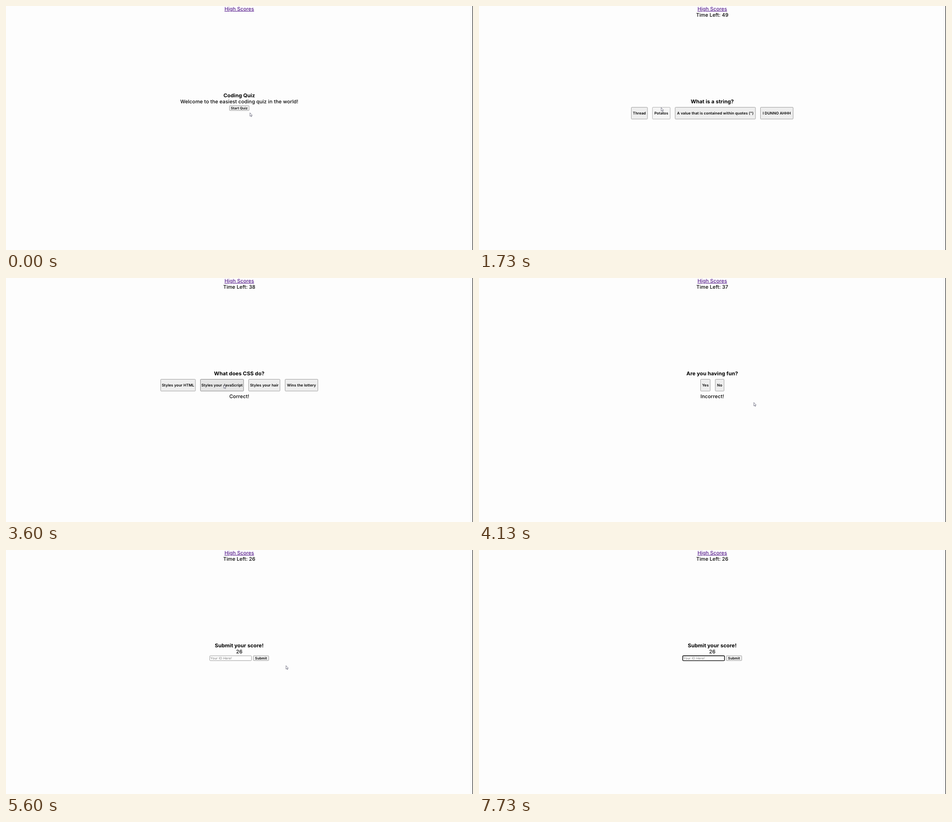
Animation, 998 px wide and 524 px high, one loop 8 s. Source, as an HTML page:

```html
<!DOCTYPE html>
<html lang="en">
<head>
<meta charset="utf-8">
<title>Coding Quiz</title>
<style>
  html, body { margin: 0; width: 100%; height: 100%; overflow: hidden; background: #fdfdfd; }
  svg { display: block; }
  text { font: 500 10.7px Inter, "Open Sans", sans-serif; letter-spacing: .1px; text-anchor: middle; text-rendering: geometricPrecision; white-space: pre; }
  .title { font-weight: 700; font-size: 11.1px; }
  .answer { font-weight: 600; font-size: 7.9px; }
  .small { font-weight: 600; font-size: 7.3px; }
  .hint { font-weight: 400; font-size: 7.1px; fill: #757575; text-anchor: start; }
  .link { fill: #551a8b; text-decoration: underline; }
  .button { fill: #eee; stroke: #8c8c8c; stroke-width: .8; }
  .hover { fill: #e5e5e5; stroke: #6c6c6c; }
  .active { fill: #f5f5f5; stroke: #a0a0a0; }
  .input { fill: #fff; stroke: #858585; stroke-width: .8; }
  .focus { stroke: #000; stroke-width: 1.4; }
  .cursor { fill: #fff; stroke: #4a4a60; stroke-width: .7; }
</style>
</head>
<body>
<svg id="stage" width="998" height="524" viewBox="0 0 998 524"></svg>
<script>
const LOOP = 8000, MID = 498.5;
const START = 665, TIMER = 1730, CSS = 1865, CORRECT = 2600, FUN = 3800, SUBMIT = 5130, FOCUS = 6180;
const stage = document.getElementById('stage');

// Answers: label, left edge, right edge
const questions = {
  string: ['What is a string?', [
    ['Thread', 325.5, 360], ['Potatos', 370.7, 408.5],
    ['A value that is contained within quotes (")', 419.2, 590.8], ['I DUNNO AHHH', 601.5, 671.3]]],
  css: ['What does CSS do?', [
    ['Styles your HTML', 330.5, 404.8], ['Styles your JavaScript', 415.5, 507.7],
    ['Styles your hair', 518.5, 585.5], ['Wins the lottery', 596.5, 666.5]]],
  fun: ['Are you having fun?', [['Yes', 473.5, 494], ['No', 505, 523.7]]]
};

// Pointer keys: time, x, y
const path = [
  [60, 521, 229], [330, 513, 223], [790, 513, 223], [1060, 470, 234], [1200, 470, 234],
  [1530, 389, 218], [2260, 389, 218], [2800, 465, 229], [3830, 465, 229], [4130, 587, 267],
  [4330, 587, 267], [4860, 484, 230], [5150, 484, 230], [5360, 545, 272], [5600, 598, 248],
  [5700, 598, 248], [5930, 585, 285], [6180, 500, 234]
];
const presses = [[600, START], [TIMER, CSS], [3730, FUN], [5060, SUBMIT]];

function pointerAt(t) {
  const i = path.findIndex(key => key[0] > t);
  if (i === 0) return path[0].slice(1);
  if (i < 0) return path[path.length - 1].slice(1);
  const [t0, x0, y0] = path[i - 1], [t1, x1, y1] = path[i];
  const u = (t - t0) / (t1 - t0), e = u * u * (3 - 2 * u);
  return [x0 + (x1 - x0) * e, y0 + (y1 - y0) * e];
}

const text = (label, y, type = '', x = MID) => `<text x="${x}" y="${y}" class="${type}">${label}</text>`;
const box = (left, top, right, bottom, type) =>
  `<rect x="${left}" y="${top}" width="${right - left}" height="${bottom - top}" rx="1.3" class="${type}"/>`;

function draw(t) {
  const [px, py] = pointerAt(t);
  const pressed = presses.some(([from, to]) => t >= from && t < to);
  const button = (label, left, top, right, bottom, type) => {
    const over = px >= left && px <= right && py >= top && py <= bottom;
    const state = over ? (pressed ? 'active' : 'hover') : '';
    return box(left, top, right, bottom, 'button ' + state) +
      text(label, (top + bottom) / 2 + 2.7, type, (left + right) / 2);
  };

  const shift = t < TIMER ? 0 : 13;
  let out = '<rect x="997" width="1" height="524"/>' + text('High Scores', 9.8, 'link');
  if (shift) {
    const left = t < 2730 ? 49 : t < 3730 ? 38 : t < 4730 ? 37 : 26;
    out += text('Time Left: ' + left, 22.9);
  }

  if (t < START) {
    out += text('Coding Quiz', 195.9, 'title') +
      text('Welcome to the easiest coding quiz in the world!', 208.9) +
      button('Start Quiz', 477.5, 214, 519.5, 224.5, 'small');
  } else if (t < SUBMIT) {
    const [title, answers] = questions[t < CSS ? 'string' : t < FUN ? 'css' : 'fun'];
    out += text(title, 195.9 + shift, 'title');
    for (const [label, left, right] of answers)
      out += button(label, left, 204.5 + shift, right, 229.8 + shift, 'answer');
    if (t >= CSS) out += text(t >= CORRECT && t < FUN ? 'Correct!' : 'Incorrect!', 258);
  } else {
    const focused = t >= FOCUS;
    out += text('Submit your score!', 208.9, 'title') + text('26', 221.9) +
      box(435.4, 227.2, 524.6, 237.6, 'input ' + (focused ? 'focus' : '')) +
      text('Your ID Here!', 234.9, 'hint', 436.8) +
      button('Submit', 528.5, 227, 561.5, 237.5, 'small');
    if (focused && Math.floor((t - FOCUS) / 500) % 2 === 0)
      out += '<rect x="436.6" y="228.6" width=".7" height="7.6"/>';
  }

  if (t < FOCUS - 30)
    out += `<path class="cursor" transform="translate(${px} ${py})" d="M.3 .3V7.8L2 6.3L3.1 8.8L4.3 8.3L3.2 5.9H5.4Z"/>`;
  stage.innerHTML = out;
}

function tick() {
  draw(performance.now() % LOOP);
  requestAnimationFrame(tick);
}
tick();
</script>
</body>
</html>
```
